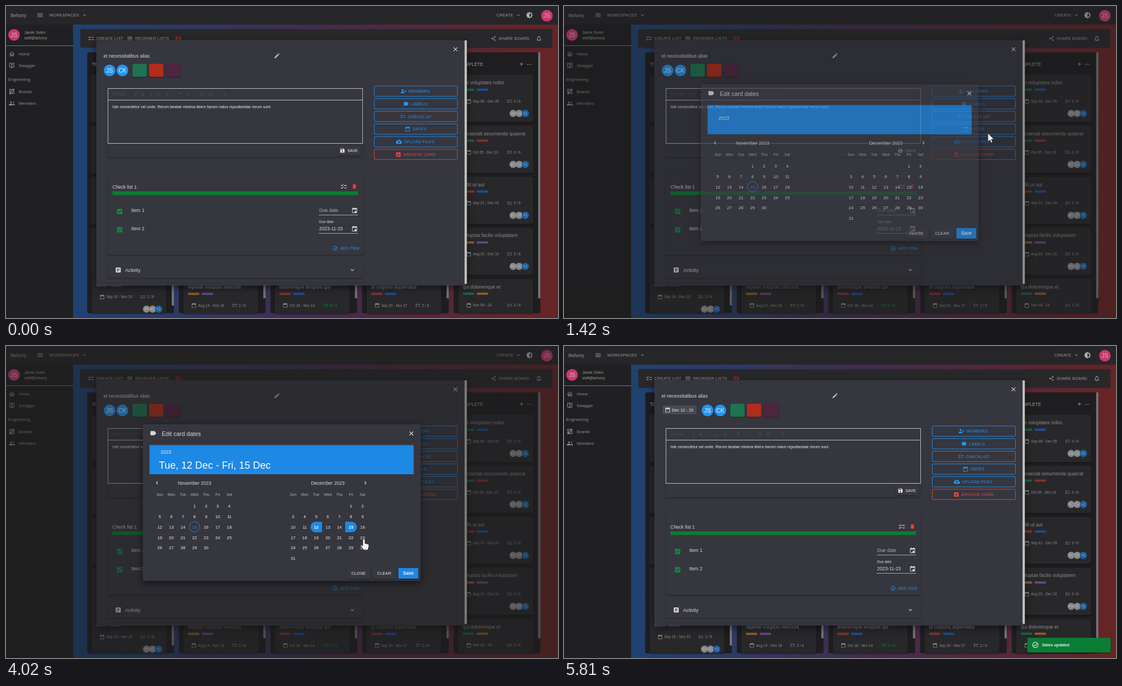
Animation, 996 px wide and 562 px high, one loop 7330 ms. Source, as an HTML page:

```html
<!DOCTYPE html>
<html lang="en">
<head>
<meta charset="utf-8">
<title>Card dates</title>
<style>
  html, body { margin: 0; width: 100%; height: 100%; overflow: hidden; background: #202022; }
  svg { display: block; width: 100%; height: 100%; font-family: "Liberation Sans", Arial, sans-serif; }
  text { white-space: pre; }
  .caps { letter-spacing: .2px; }
  .mid { text-anchor: middle; }
  .end { text-anchor: end; }
  .bold { font-weight: bold; }
  .raised { filter: drop-shadow(0 1px 1.2px rgba(0,0,0,.4)); }
  .float { filter: drop-shadow(0 4px 7px rgba(0,0,0,.5)); }
</style>
</head>
<body>
<svg id="stage" viewBox="0 0 996 562"></svg>
<script>
const LOOP = 7330;
const BLUE = '#2196f3', PRIMARY = '#1e88e5', RED = '#f44336', GREEN = '#0a7d34', PAPER = '#36363f';
const WHITE = '#f0f0f0', SOFT = '#d8d8da', MUTED = '#9b9b9b', DIM = '#8b8b8c';

// Icons live on a 24-unit grid.
const ICONS = {
  menu: 'M3 6h18v2H3zM3 11h18v2H3zM3 16h18v2H3z',
  down: 'M7.4 8.6 12 13.2l4.6-4.6L18 10l-6 6-6-6z',
  left: 'M15.4 7.4 10.8 12l4.6 4.6L14 18l-6-6 6-6z',
  right: 'M8.6 7.4 13.2 12l-4.6 4.6L10 18l6-6-6-6z',
  close: 'M19 6.4 17.6 5 12 10.6 6.4 5 5 6.4 10.6 12 5 17.6 6.4 19 12 13.4 17.6 19 19 17.6 13.4 12z',
  calendar: 'M19 4h-1V2h-2v2H8V2H6v2H5a2 2 0 0 0-2 2v14a2 2 0 0 0 2 2h14a2 2 0 0 0 2-2V6a2 2 0 0 0-2-2zm0 16H5V9h14z',
  checklist: 'M22 7h-9v2h9zM22 15h-9v2h9zM5.5 11 2 7.5l1.4-1.4 2.1 2.1 4.3-4.3 1.4 1.4zM5.5 19 2 15.5l1.4-1.4 2.1 2.1 4.3-4.3 1.4 1.4z',
  trash: 'M6 19a2 2 0 0 0 2 2h8a2 2 0 0 0 2-2V7H6zM19 4h-3.5l-1-1h-5l-1 1H5v2h14z',
  save: 'M17 3H5a2 2 0 0 0-2 2v14a2 2 0 0 0 2 2h14a2 2 0 0 0 2-2V7zM12 19a3 3 0 1 1 0-6 3 3 0 0 1 0 6zM15 9H5V5h10z',
  edit: 'M3 17.2V21h3.8L17.8 9.9l-3.7-3.7zM20.7 7a1 1 0 0 0 0-1.4l-2.3-2.3a1 1 0 0 0-1.4 0l-1.9 1.8 3.8 3.8z',
  label: 'M17.6 5.8A2 2 0 0 0 16 5H5a2 2 0 0 0-2 2v10a2 2 0 0 0 2 2h11a2 2 0 0 0 1.6-.8L22 12z',
  people: 'M9 12a4 4 0 1 0 0-8 4 4 0 0 0 0 8zM1 20v-2c0-2.7 5.3-4 8-4s8 1.3 8 4v2zM19 8h2v3h3v2h-3v3h-2v-3h-3v-2h3z',
  group: 'M9 11a3 3 0 1 0 0-6 3 3 0 0 0 0 6zM1 19v-2c0-2.500 5-4 8-4s7 1.500 7 4v2zM17 11a3 3 0 1 0 0-6zM17 13c3 .3 6 1.600 6 4v2h-5z',
  upload: 'M19.4 10A7.500 7.500 0 0 0 5.400 8 6 6 0 0 0 6 20h13a5 5 0 0 0 .4-10zM14 13v4h-4v-4H7l5-5 5 5z',
  archive: 'M20.5 5.2 19 3.5H5L3.5 5.2 3 6.500V19a2 2 0 0 0 2 2h14a2 2 0 0 0 2-2V6.500zM12 17.500 6.500 12H10v-2h4v2h3.500z',
  article: 'M19 3H5a2 2 0 0 0-2 2v14a2 2 0 0 0 2 2h14a2 2 0 0 0 2-2V5a2 2 0 0 0-2-2zM7 7h10v2H7zM7 11h10v2H7zM7 15h7v2H7z',
  done: 'M12 2a10 10 0 1 0 0 20 10 10 0 0 0 0-20zm0 18a8 8 0 1 1 0-16 8 8 0 0 1 0 16zM16.6 7.6 10 14.200l-2.600-2.600L6 13l4 4 8-8z',
  checkbox: 'M5 3h14a2 2 0 0 1 2 2v14a2 2 0 0 1-2 2H5a2 2 0 0 1-2-2V5a2 2 0 0 1 2-2zM10 17l9-9-1.400-1.400-7.600 7.600-3.600-3.600L5 12z',
  home: 'M12 5.700l5 4.500V18h-2v-6H9v6H7v-7.800zM12 3 2 12h3v8h6v-6h2v6h6v-8h3z',
  help: 'M3 2h18v16h-6l-3 4-3-4H3zM5 4v12h14V4zM9 6h6v5h-2v2h-2V9h2V8H9zM11 14h2v1.500h-2z',
  boards: 'M3 3h8v9H3zM5 5v5h4V5zM13 3h8v5h-8zM3 14h8v7H3zM13 10h8v11h-8zM15 12v7h4v-7z',
  bell: 'M14 20h-4a2 2 0 0 0 4 0zM18 16v-5c0-3-1.600-5.600-4.500-6.300V4a1.500 1.500 0 0 0-3 0v.7C7.600 5.400 6 8 6 11v5l-2 2v1h16v-1zM16 17H8v-6c0-2.500 1.500-4.500 4-4.500s4 2 4 4.500z',
  share: 'M18 2a3 3 0 1 0 .01 0zM6 9a3 3 0 1 0 .01 0zM18 16a3 3 0 1 0 .01 0zM8 11l8-5 1 1.500-7 4.500 7 4.500-1 1.500-8-5z',
  theme: 'M20 8.700V4h-4.700L12 .7 8.700 4H4v4.700L.7 12 4 15.300V20h4.700l3.300 3.300 3.300-3.300H20v-4.700l3.300-3.300zM12 18V6a6 6 0 0 1 0 12z',
  hidden: 'M12 5C7 5 2.700 8 1 12c1.700 4 6 7 11 7s9.300-3 11-7c-1.700-4-6-7-11-7zM12 17a5 5 0 1 1 0-10 5 5 0 0 1 0 10zM3 2l18 19-1.400 1.400L1.600 3.400z'
};

// Text, icons and avatars are placed by their vertical centre.
const text = (x, y, s, size, fill, cls = '', more = '') =>
  `<text x="${x}" y="${y + size * .36}" font-size="${size}" fill="${fill}" class="${cls}" ${more}>${s}</text>`;
const rect = (x, y, w, h, fill, more = '') =>
  `<rect x="${x}" y="${y}" width="${w}" height="${h}" fill="${fill}" ${more}/>`;
const icon = (name, x, y, size, fill) =>
  `<path d="${ICONS[name]}" fill="${fill}" fill-rule="evenodd" transform="translate(${x - size / 2} ${y - size / 2}) scale(${size / 24})"/>`;
const avatar = (x, y, r, fill, s, size, color) =>
  `<circle cx="${x}" cy="${y}" r="${r}" fill="${fill}"/>` + text(x, y, s, size, color, 'mid');
const line = (x1, x2, y, color, w = 1) =>
  `<path d="M${x1} ${y}H${x2}" stroke="${color}" stroke-width="${w}"/>`;

function navigation() {
  const item = (name, s, y) => icon(name, 10.5, y, 12, DIM) + text(23, y, s, 7.5, DIM);
  return rect(0, 33, 121, 529, '#202022') + rect(0, 0, 996, 33.5, '#262628') +
    text(8, 16.5, 'Belvory', 8.6, MUTED) + icon('menu', 61.5, 16.5, 13, MUTED) +
    text(78, 16.5, 'WORKSPACES', 7.3, MUTED, 'caps') + icon('down', 141.500, 16.5, 10, MUTED) +
    text(885, 16.5, 'CREATE', 7.3, MUTED, 'caps') + icon('down', 924.500, 16.5, 10, MUTED) +
    icon('theme', 944.5, 16.5, 13, '#b5b5b5') + avatar(976, 17.5, 10.5, '#c63a6b', 'JS', 10.5, '#dcb3c2') +
    avatar(14.5, 52, 10.5, '#c63a6b', 'JS', 10.5, '#dcb3c2') +
    text(33, 47, 'Jarek Solm', 7.6, MUTED) + text(33, 58, 'staff@belvory', 6.7, MUTED) +
    line(0, 121, 71.5, '#77777a') + item('home', 'Home', 86.5) + item('help', 'Swagger', 107.5) +
    text(4, 132, 'Engineering', 7.5, DIM) + item('boards', 'Boards', 154) + item('group', 'Members', 175.5);
}

const TAGS = { g: '#1b6147', b: '#1d4b97', r: '#85302a', o: '#8f5a22', p: '#65477f' };

function boardCard(x, y, h, title, tags, dates, count, people, endX) {
  const chip = y + 47.5, tone = count[0] === '6' ? '#1b7d4e' : DIM;
  return rect(x - 8, y, 135, h, '#28282b', 'rx="3" class="raised"') +
    (endX ? text(endX, y + 14, title, 8.5, DIM, 'end') : text(x, y + 14, title, 8.5, DIM)) +
    [...tags].map((k, i) => rect(x + i * 25, y + 24.700, 21, 4, TAGS[k], 'rx="2"')).join('') +
    icon('calendar', x + 11, chip, 10, DIM) + text(x + 18.5, chip, dates, 6.5, DIM) +
    icon('checklist', x + 84.500, chip, 10, tone) + text(x + 92, chip, count, 6.5, tone) +
    people.map((s, i) => avatar(x + 91 + i * 11, y + 69.500, 6.5, s === '+1' ? '#1c62a5' : '#858587', s, 6.5, '#b5b5b5')).join('');
}

function board() {
  const left = i => 146.5 + 165.300 * i;
  let s = rect(121, 33, 875, 529, 'url(#wall)') + rect(134, 41.500, 852, 34, '#28282b', 'rx="3"') +
    icon('checklist', 153.500, 58.500, 12, MUTED) + text(163, 58.500, 'CREATE LIST', 7.3, MUTED, 'caps') +
    icon('menu', 223.500, 58.500, 12, MUTED) + text(233, 58.500, 'REORDER LISTS', 7.3, MUTED, 'caps') +
    icon('hidden', 311, 58.500, 12, '#9c2b26') + icon('share', 879.500, 58.500, 10, MUTED) +
    text(889, 58.500, 'SHARE BOARD', 7.3, MUTED, 'caps') + icon('bell', 961.500, 58.500, 12, MUTED);
  for (let i = 0; i < 5; i++) s += rect(left(i), 83.5, 156.500, 470, '#1e1e21', 'rx="3"');
  s += text(155, 105.500, 'TO DO', 8.2, MUTED) + text(816, 105.500, 'COMPLETE', 8.2, MUTED) +
    text(930, 104.500, '+', 13, MUTED, 'mid') + text(944, 103, '…', 9, MUTED, 'mid bold');
  for (let i = 0; i < 4; i++) s += rect(154.500, 124 + 92 * i, 135, 85, '#28282b', 'rx="3"');
  s += boardCard(162.500, 476.500, 77, '', 'pp', 'Sep 16 - Nov 19', '2 / 6', ['AN', 'BC', '+1']) +
    boardCard(328, 491.700, 62, 'repellat voluptas nesciunt', 'op', 'Aug 14 - Nov 18', '2 / 6', []) +
    boardCard(493, 491.700, 62, 'doloremque tempore qui', 'rb', 'Oct 18 - Nov 14', '6 / 6', []) +
    boardCard(658.500, 491.700, 62, 'ut corporis aspernatur', 'rb', 'Sep 20 - Nov 27', '2 / 6', []);
  [['et voluptates nobis', 'gb', 'Sep 08 - Dec 05', 'AN', 'CK', 899],
   ['obcaecati assumenda quaerat', 'gr', 'Oct 05 - Dec 10', 'BC', 'CH', 937],
   ['mollit ut aut', 'rb', 'Sep 21 - Dec 03', 'BC', 'CR', 863],
   ['voluptas facilis voluptatem', 'op', 'Aug 23 - Dec 10', 'AN', 'VK', 923]
  ].forEach(([title, tags, dates, a, b, end], i) => {
    s += boardCard(824, 124 + 91.800 * i, 85, title, tags, dates, '3 / 6', [a, b, '+1'], end);
  });
  s += boardCard(824, 491.500, 62, 'qui doloremque et', 'go', 'Nov 09 - 16', '1 / 6', []);
  for (let i = 0; i < 5; i++) s += rect(left(i) + 152.500, 83.5, 4, i ? 443 : 456, '#747475');
  return s;
}

const ACTIONS = [['people', 'MEMBERS', 726], ['label', 'LABELS', 731], ['checklist', 'CHECKLIST', 725],
  ['calendar', 'DATES', 733.500], ['upload', 'UPLOAD FILES', 718], ['archive', 'ARCHIVE CARD', 717]];
const actionY = i => 153.300 + 22.800 * i;

function actionButton([name, label, x], i) {
  const color = i === 5 ? RED : BLUE, y = actionY(i);
  return `<rect class="action" x="664.5" y="${y - 9.300}" width="150" height="18.600" rx="1.500" fill="${color}" fill-opacity="0" stroke="${color}" stroke-opacity=".85"/>` +
    icon(name, x - 9, y, 11, color) + text(x, y, label, 7.4, color, 'caps');
}

function cardModal() {
  const faint = '#4b4b54';
  const tile = (x, c) => rect(x, 104, 26, 23.500, c, 'rx="3.500" class="raised"');
  const tools = [['T', 234], ['B', 247], ['I', 262], ['U', 276], ['S', 291], ['❞', 315], ['‹›', 329]];
  const item = (s, y, date) => icon('checkbox', 205, y + 2.500, 13, '#0a8c3e') + text(226, y, s, 8.5, SOFT) +
    text(565, y + .5, date, 8.5, date[0] === 'D' ? '#a9a9ad' : SOFT) + icon('calendar', 629, y + .5, 12, SOFT) +
    rect(629, y + 1.500, 3, 3, SOFT) + line(564.500, 635.500, y + 9, '#a6a6aa');
  return rect(163, 61.500, 668, 442, PAPER, 'rx="2" class="float"') + rect(827.500, 62, 4, 438.500, '#c6c6c1') +
    text(176, 89.500, 'et necessitatibus alias', 8.5, SOFT) + icon('edit', 489, 89.500, 12, '#b5b5b8') + icon('close', 811, 78, 13, SOFT) +
    `<g id="chip">${rect(178, 107, 61, 16, '#4a4a52', 'rx="2"')}${icon('calendar', 187, 115, 11, SOFT)}${text(194.500, 115, 'Dec 12 - 15', 7.5, WHITE)}</g>` +
    `<g id="badges">${avatar(187, 116, 10.500, BLUE, 'JS', 10.500, WHITE)}${avatar(210, 116, 10.500, BLUE, 'CK', 10.500, WHITE)}` +
    tile(228, '#1f7350') + tile(258, '#b12c1a') + tile(288.500, '#4f2541') + '</g>' +
    rect(184, 145, 460, 127.500, PAPER, 'class="raised"') + rect(184, 148.500, 459.500, 99, 'none', 'stroke="#bdbdc0"') + line(184, 643.500, 169.500, '#bdbdc0') +
    text(193, 159, 'Normal', 6.8, faint) + tools.map(([s, x]) => text(x, 159, s, 8, faint, 'mid bold')).join('') +
    icon('menu', 354, 159, 10, faint) + icon('menu', 369, 159, 10, faint) + icon('share', 394, 159, 9, faint) +
    text(192, 181, 'Iste consectetur vel unde. Rerum beatae minima libero harum natus repudiandae rerum sunt.', 6.96, WHITE) +
    rect(598, 252, 42, 17, '#38383f', 'rx="2" class="raised"') + icon('save', 607, 260.500, 10, WHITE) + text(616, 260.500, 'SAVE', 7, WHITE, 'caps') +
    rect(184, 300, 460, 148.500, PAPER, 'class="raised"') + rect(184, 461, 460, 29, PAPER, 'class="raised"') + line(176, 651, 498.500, '#2b2b32') +
    text(192, 325.500, 'Check list 1', 8.5, SOFT) + icon('checklist', 609.500, 325.500, 13, SOFT) + icon('trash', 628.500, 325, 10.500, RED) +
    rect(192, 334, 443.500, 6.500, GREEN) + item('Item 1', 367.500, 'Due date') + item('Item 2', 400.500, '2023-11-23') +
    text(565, 388.500, 'Due date', 6.4, SOFT) + icon('done', 594, 436.500, 10, BLUE) + text(603, 436.500, 'ADD ITEM', 6.85, BLUE, 'caps') +
    icon('article', 202.500, 475.500, 12, SOFT) + text(215, 475.500, 'Activity', 8.700, SOFT) + icon('down', 625, 475.500, 12, SOFT) +
    ACTIONS.map(actionButton).join('');
}

const STEP = 20.900, ROW = 18.800, NOV = 277.500, DEC = 518, TODAY = 15;

function month(x0, name, firstColumn, length, today) {
  let s = text(x0 + 3 * STEP, 247, name, 8.5, SOFT, 'mid');
  ['Sun', 'Mon', 'Tue', 'Wed', 'Thu', 'Fri', 'Sat'].forEach((d, i) => s += text(x0 + i * STEP, 268, d, 6.8, '#b2b2b5', 'mid'));
  for (let d = 1; d <= length; d++) {
    const cell = d - 1 + firstColumn, x = x0 + cell % 7 * STEP, y = 288.500 + Math.floor(cell / 7) * ROW;
    if (d === today) s += `<circle cx="${x}" cy="${y - .5}" r="9.300" fill="none" stroke="${PRIMARY}"/>`;
    s += text(x, y, d, 7.700, d === today ? PRIMARY : WHITE, 'mid');
  }
  return s;
}

function datesDialog() {
  const flat = (x, w, s) => rect(x, 400, w, 19, '#38383f', 'rx="2" class="raised"') + text(x + w / 2, 409.500, s, 7.3, WHITE, 'mid caps');
  return rect(247, 141, 501, 282, PAPER, 'rx="2" class="float"') +
    icon('label', 265.500, 157, 13, SOFT) + text(281, 158, 'Edit card dates', 10.600, SOFT) + icon('close', 731.500, 157.500, 13, WHITE) +
    rect(259, 178.500, 476.500, 52.500, PRIMARY) + text(279, 0, '2023', 8.5, WHITE, '', 'id="year"') + text(276, 215, '', 18, '#fff', '', 'id="range"') +
    icon('left', 272.500, 246.500, 12, WHITE) + icon('right', 648.500, 246.500, 12, WHITE) +
    month(NOV, 'November 2023', 3, 30, TODAY) + month(DEC, 'December 2023', 5, 31) + '<g id="picked"></g>' +
    flat(614.500, 43, 'CLOSE') + flat(661.500, 42, 'CLEAR') +
    rect(708, 400, 36, 19, PRIMARY, 'id="save" rx="2" class="raised"') + text(726, 409.500, 'Save', 8.2, WHITE, 'mid bold');
}

const toast = () => rect(836, 525.500, 150.500, 26.500, GREEN, 'rx="2" class="raised"') +
  icon('done', 850.500, 538.500, 13, WHITE) + text(863, 538.500, 'Dates updated', 7.1, WHITE, 'bold');

const stage = document.getElementById('stage');
stage.innerHTML = `<defs><linearGradient id="wall"><stop stop-color="#1f4272"/><stop offset=".5" stop-color="#432b4e"/><stop offset="1" stop-color="#672424"/></linearGradient></defs>` +
  board() + navigation() + cardModal() +
  `<g id="dialog">${rect(0, 0, 996, 562, '#1c1c1c', 'fill-opacity=".43"')}${datesDialog()}</g><g id="toast">${toast()}</g>
  <g id="cursor" fill="#fff" stroke="#222" stroke-width=".5">
    <path id="arrow" d="M0 0V14.500l3.400-3.200 2.200 5.200 2.200-1-2.200-5h4.600z"/>
    <path id="hand" d="M-2 2a1.700 1.700 0 0 1 3.400 0V8l5.400 1.200q2 .6 1.800 2.600l-.9 4.400-1 3.300h-7.300l-1.200-2-4-5.600q.4-1.800 2.200-.6l1.600 1.600z"/>
  </g>`;
const el = id => document.getElementById(id);
const actions = [...document.querySelectorAll('.action')];

// Pointer path: time, x, y
const PATH = [[50, 913, 491], [760, 775, 228], [970, 772, 226], [1350, 772, 226], [1980, 577, 328], [2030, 577, 328],
  [2340, 562, 331], [2650, 562, 331], [3360, 622, 328], [3700, 622, 328], [4700, 721, 409], [5460, 721, 409], [5810, 905, 570]];
const FIRST_PICK = 2590, SECOND_PICK = 3560, OPEN = 1270, CLOSE = 4890, SAVED = 5000;

const ramp = (t, a, b) => Math.min(1, Math.max(0, (t - a) / (b - a)));
const smooth = k => k * k * (3 - 2 * k);
const show = (id, on) => el(id).setAttribute('opacity', +on);
const inside = ([x, y], x1, y1, x2, y2) => x >= x1 && x <= x2 && y >= y1 && y <= y2;

function pointer(t) {
  const i = Math.max(1, PATH.findIndex(p => p[0] > t));
  const [t0, x0, y0] = PATH[i - 1], [t1, x1, y1] = PATH[i], k = smooth(ramp(t, t0, t1));
  return [x0 + (x1 - x0) * k, y0 + (y1 - y0) * k];
}

function pickedDay(day, side) {
  const x = DEC + (day - 10) * STEP, r = 9.500, w = STEP / 2, y = 326;
  return `<path d="M${x - side * w} ${y - r}h${side * (2 * w - r)}a${r} ${r} 0 0 ${side > 0 ? 1 : 0} 0 ${2 * r}h${-side * (2 * w - r)}z" fill="${PRIMARY}"/>` +
    text(x, y, day, 7.700, '#fff', 'mid bold');
}

function draw(t) {
  const open = t >= OPEN && t < CLOSE, picking = t >= FIRST_PICK, done = t >= SECOND_PICK;
  const visible = t >= 50 && t < 5800, tip = pointer(Math.min(t, 5809));
  const hovered = open || !visible ? -1 : actions.findIndex((_, i) => inside(tip, 664, actionY(i) - 9.500, 815, actionY(i) + 9.500));
  actions.forEach((a, i) => a.setAttribute('fill-opacity', i === hovered ? .08 : 0));

  const overSave = inside(tip, 708, 400, 744, 419);
  const overDay = inside(tip, 268, 279, 413, 392) || inside(tip, 508, 279, 654, 392);
  const hand = hovered >= 0 || open && (overSave || overDay || inside(tip, 614, 400, 704, 419));
  show('cursor', visible);
  show('hand', hand);
  show('arrow', !hand);
  el('cursor').setAttribute('transform', `translate(${tip})`);

  show('dialog', smooth(ramp(t, OPEN, 1500)) * (1 - smooth(ramp(t, CLOSE, 5100))));
  el('save').setAttribute('fill', open && overSave ? '#1976d2' : PRIMARY);
  el('year').setAttribute('y', picking ? 194 : 204.500);
  el('range').textContent = !picking ? '' : done ? 'Tue, 12 Dec - Fri, 15 Dec' : 'Tue, 12 Dec -';
  const last = done ? 15 : 10 + Math.floor((tip[0] - 4 - DEC + STEP / 2) / STEP);
  el('picked').innerHTML = picking ? pickedDay(12, -1) + (last > 12 ? pickedDay(last, 1) : '') : '';

  show('chip', t >= SAVED);
  el('badges').setAttribute('transform', `translate(${t >= SAVED ? 72 : 0})`);
  show('toast', ramp(t, 5140, 5300));
}

// Each rounded end faces outward: -1 starts the range, 1 ends it.
function frame(now) {
  draw(now % LOOP);
  requestAnimationFrame(frame);
}
draw(0);
requestAnimationFrame(frame);
</script>
</body>
</html>
```
